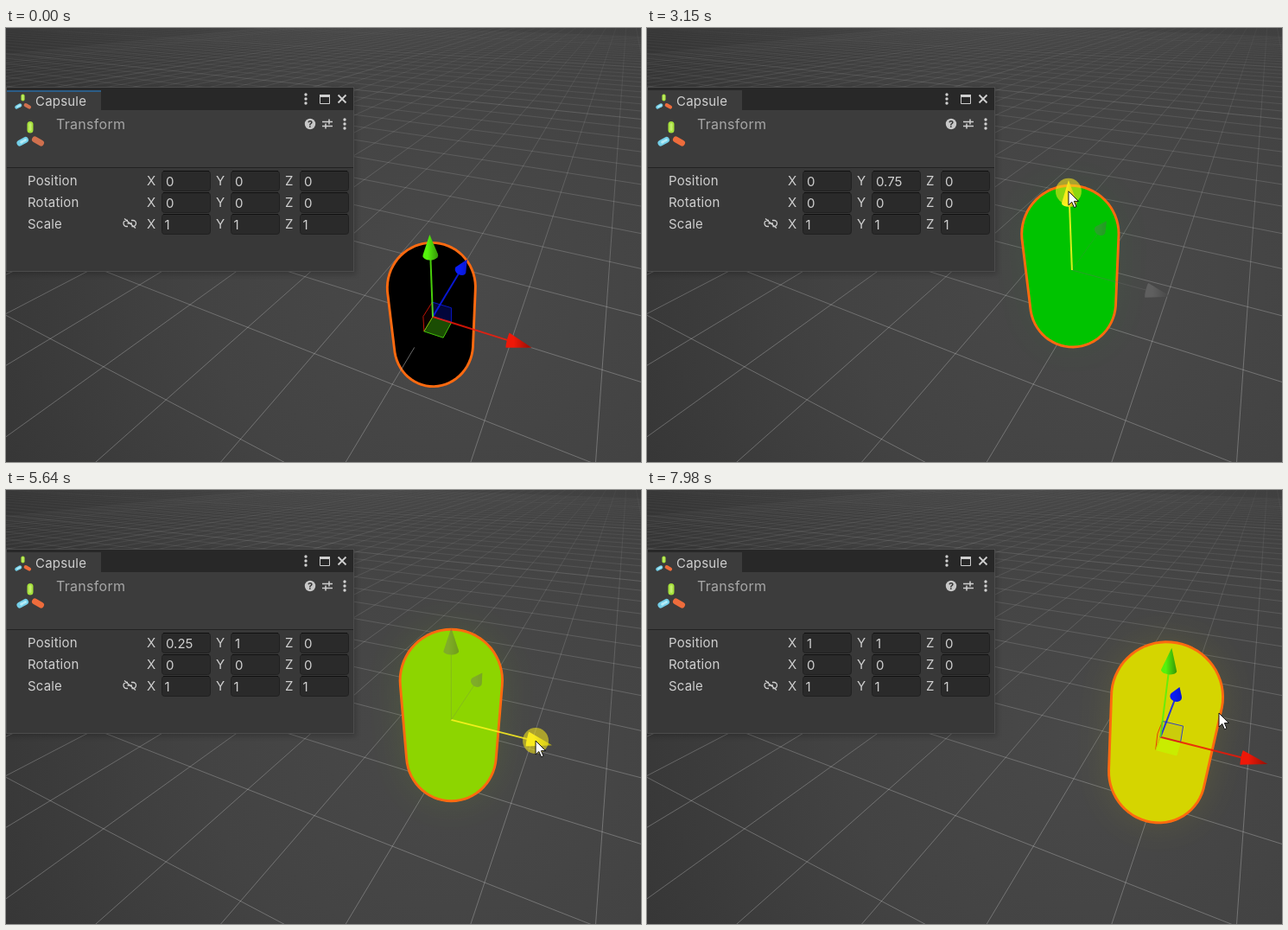
Write an HTML page that moves like this. It is 735 by 502 pixels and loops after 8 s.

```html
<!DOCTYPE html>
<html lang="en">
<head>
<meta charset="utf-8">
<title>Capsule position colour</title>
<style>
  html, body { margin: 0; width: 100%; height: 100%; overflow: hidden; background: #404040; }
  svg { display: block; width: 735px; height: 502px; }
  text { font-family: Inter, sans-serif; font-size: 15px; fill: #cfcfcf; }
  .name { letter-spacing: .15px; }
</style>
</head>
<body>
<svg id="stage" viewBox="0 0 735 502" xmlns="http://www.w3.org/2000/svg">
  <defs>
    <radialGradient id="floor" gradientUnits="userSpaceOnUse" cx="520" cy="290" r="580">
      <stop offset="0" stop-color="#494949"/>
      <stop offset=".5" stop-color="#434343"/>
      <stop offset="1" stop-color="#363636"/>
    </radialGradient>
    <linearGradient id="fade" gradientUnits="userSpaceOnUse" x1="0" y1="0" x2="0" y2="360">
      <stop offset="0" stop-color="#fff" stop-opacity=".03"/>
      <stop offset=".35" stop-color="#fff" stop-opacity=".11"/>
      <stop offset="1" stop-color="#fff" stop-opacity=".25"/>
    </linearGradient>
    <linearGradient id="shade" x1="0" y1="0" x2="1" y2="0">
      <stop offset=".3" stop-opacity="0"/>
      <stop offset="1" stop-opacity=".38"/>
    </linearGradient>
    <filter id="blur" x="-100%" y="-100%" width="300%" height="300%">
      <feGaussianBlur stdDeviation="22"/>
    </filter>
    <filter id="soft" x="-10%" y="-10%" width="120%" height="120%">
      <feGaussianBlur stdDeviation="3"/>
    </filter>
  </defs>
  <rect width="735" height="502" fill="url(#floor)"/>
  <g id="grid" stroke="url(#fade)" fill="none"></g>
  <g id="scene"></g>
  <g id="panel">
    <rect x="-4" y="69" width="409" height="216" opacity=".2" filter="url(#soft)"/>
    <rect y="68" width="403" height="214" fill="#4c4c4c"/>
    <rect x="1" y="69" width="401" height="26" fill="#282828"/>
    <path d="M1 95V72H110V95Z" fill="#3c3c3c"/>
    <rect id="focus" x="1" y="72" width="109" height="2" fill="#2c5d87"/>
    <rect x="1" y="95" width="401" height="66" fill="#3c3c3c"/>
    <rect x="1" y="161" width="401" height="1" fill="#222"/>
    <rect x="1" y="162" width="401" height="119" fill="#383838"/>
    <text x="34" y="90" style="letter-spacing:.2px">Capsule</text>
    <text x="58" y="117" style="font-size:16px;letter-spacing:.3px;fill:#a6a6a6">Transform</text>
    <g fill="none" stroke="#cfcfcf">
      <path d="M363.5 77.5H374.5V87.5H363.5Z"/>
      <path d="M363 78.5H375" stroke-width="3"/>
      <path d="M384.5 77.5L393.5 86.5M393.5 77.5L384.5 86.5" stroke-width="1.8"/>
      <path d="M366 108.5H378M366 113.5H378M374 105.5V111.5M370 110.5V116.5" stroke-width="1.5"/>
      <path d="M141 222.5H139.5A3.5 3.5 0 0 0 139.5 229.5H141M145 222.5H147A3.5 3.5 0 0 1 147 229.5H145.5M140.5 226H146M137 220.5L150 231.5" stroke-width="1.3"/>
    </g>
    <circle cx="352" cy="111" r="6.2" fill="#c8c8c8"/>
    <text x="352" y="115" text-anchor="middle" style="font-size:11px;font-weight:700;fill:#333">?</text>
  </g>
  <g id="top"></g>
</svg>
<script>
const LOOP = 8000, F = 426, CX = 516, CY = 221, DIST = 4.594;
const rad = Math.PI / 180, PITCH = 31.9 * rad, YAW = 22.2 * rad;
const sp = Math.sin(PITCH), cp = Math.cos(PITCH), sy = Math.sin(YAW), cy = Math.cos(YAW);
const byId = id => document.getElementById(id);

function el(tag, attrs, parent) {
  const e = document.createElementNS('http://www.w3.org/2000/svg', tag);
  set(e, attrs);
  parent.appendChild(e);
  return e;
}
function set(e, attrs) {
  for (const k in attrs) e.setAttribute(k, attrs[k]);
}

// World to camera space: right, down, forward
function view([x, y, z]) {
  const ahead = z * cy - x * sy;
  return [
    (494 - CX) / F * DIST + x * cy + z * sy,
    (334 - CY) / F * DIST - y * cp - ahead * sp,
    DIST + ahead * cp - y * sp
  ];
}
const flat = ([x, y, z]) => [CX + F * x / z, CY + F * y / z];
const project = p => flat(view(p));
const pathOf = pts => 'M' + pts.map(p => p[0].toFixed(2) + ' ' + p[1].toFixed(2)).join('L');
const closed = pts => pathOf(pts) + 'Z';
const add = (p, axis, n) => p.map((v, i) => v + axis[i] * n);

function hull(pts) {
  pts = pts.slice().sort((a, b) => a[0] - b[0] || a[1] - b[1]);
  const half = list => {
    const h = [];
    for (const p of list) {
      while (h.length > 1) {
        const a = h[h.length - 2], b = h[h.length - 1];
        if ((b[0] - a[0]) * (p[1] - a[1]) - (b[1] - a[1]) * (p[0] - a[0]) > 0) break;
        h.pop();
      }
      h.push(p);
    }
    return h.slice(0, -1);
  };
  return half(pts).concat(half(pts.reverse()));
}

// Silhouette of a ball as seen by the camera
function ballRim(center, r) {
  const c = view(center), d = Math.hypot(...c), n = c.map(v => v / d);
  const l = Math.hypot(n[0], n[2]), u = [-n[2] / l, 0, n[0] / l];
  const v = [n[1] * u[2], n[2] * u[0] - n[0] * u[2], -n[1] * u[0]];
  const k = 1 - r * r / d / d, rr = r * Math.sqrt(k), pts = [];
  for (let i = 0; i < 64; i++) {
    const a = i / 32 * Math.PI;
    pts.push(flat(c.map((q, j) => q * k + (u[j] * Math.cos(a) + v[j] * Math.sin(a)) * rr)));
  }
  return pts;
}

// Floor grid
function gridLine(a, b, major) {
  const d = pathOf([project(a), project(b)]);
  el('path', { d }, byId('grid'));
  if (major) el('path', { d, opacity: .6 }, byId('grid'));
}
for (let x = -34; x <= 12; x++)
  gridLine([x, 0, (.3 - DIST + x * sy * cp) / (cy * cp)], [x, 0, 60], x % 10 === 0 && x);
for (let z = -4; z <= 36; z++)
  gridLine([-70, 0, z], [(DIST + z * cy * cp - .3) / (sy * cp), 0, z], z % 10 === 0 && z);

// Panel details
const panel = byId('panel'), fields = [];
function dots(x, y) {
  for (const k of [-5, 0, 5]) el('circle', { cx: x, cy: y + k, r: 1.7, fill: '#cfcfcf' }, panel);
}
dots(347, 82);
dots(392, 111);
const label = (x, y, s) => {
  const t = el('text', { x, y }, panel);
  t.textContent = s;
  return t;
};
['Position', 'Rotation', 'Scale'].forEach((name, row) => {
  const y = 165 + row * 25, inset = row === 2 ? 2.5 : 4;
  label(25, y + 17, name).setAttribute('class', 'name');
  ['X', 'Y', 'Z'].forEach((axis, col) => {
    const x = 181 + col * 80;
    label(x - 18, y + 17, axis);
    el('rect', { x: x - .5, y: y + .5, width: 56, height: 23, rx: 3, fill: '#2a2a2a', stroke: '#202020' }, panel);
    el('path', { d: `M${x + 1} ${y + .5}h53`, stroke: '#101010' }, panel);
    fields.push(label(x + inset, y + 18, row === 2 ? '1' : '0'));
  });
});
function trio(x, y, s) {
  const arm = (d, stroke, extra) => el('path', {
    d, stroke, 'stroke-width': 7, 'stroke-linecap': 'round', fill: 'none',
    transform: `translate(${x} ${y}) scale(${s})`, ...extra
  }, panel);
  arm('M0 -11.5V-5', '#a5e03c');
  arm('M0 -11.5V-5', '#c4ee6a', { 'stroke-width': 3, 'stroke-dasharray': '2 2' });
  arm('M-5.5 6.5L-12 10', '#74cfe8');
  arm('M-5.5 6.5L-12 10', '#b4ecf8', { 'stroke-width': 3, 'stroke-dasharray': '1.5 2.5' });
  return arm('M5.5 6L12.5 10', '#d0704e');
}
const arms = [trio(28, 123, 1), trio(19.5, 85.5, .6)];

// Capsule
const scene = byId('scene');
const glow = el('path', { filter: 'url(#blur)' }, scene);
const body = el('path', {
  stroke: '#ff6a10', 'stroke-width': 5.8, 'stroke-linejoin': 'round', 'paint-order': 'stroke'
}, scene);
const seam = el('path', {
  d: pathOf([project([0, 0, -.5]), project([0, 0, -.82])]), stroke: '#b0b0b0'
}, scene);

// Move handle
const AXES = { x: [1, 0, 0], y: [0, 1, 0], z: [0, 0, 1] };
const COLORS = { x: '#ee1808', y: '#55f20c', z: '#0a1cf5' };
const planes = ['x', 'y', 'z'].map(k => ({ k, e: el('path', { stroke: COLORS[k] }, scene) }));
const handles = {};
for (const k of ['z', 'x', 'y']) {
  const g = el('g', {}, scene);
  handles[k] = {
    g, shaft: el('path', { fill: 'none' }, g),
    cone: el('path', {}, g), dark: el('path', { fill: 'url(#shade)' }, g)
  };
}

const halo = el('circle', { r: 15, fill: '#f4e61c' }, byId('top'));
const pointer = el('path', {
  d: 'M0 0V16L3.8 12.5L6.5 18.8L9 17.7L6.4 11.6H11.5Z',
  fill: '#fff', stroke: '#111'
}, byId('top'));

// time, x, y, eased
const PATH = [
  [180, 652, 490], [330, 494, 264, 1], [450, 494, 264], [760, 514, 262, 1], [1050, 495, 251, 1],
  [2210, 495, 251], [2570, 489, 219], [3000, 488, 190], [3120, 488, 190], [3690, 487, 168],
  [4240, 487, 168], [5060, 594, 287, 1], [5090, 594, 287], [5640, 613, 290], [5890, 629, 297],
  [6430, 659.5, 306.5], [6720, 671, 309], [7300, 690, 311], [7770, 690, 311], [7980, 662, 258, 1]
];
function pointerAt(t) {
  let i = 1;
  while (i < PATH.length - 1 && t > PATH[i][0]) i++;
  const a = PATH[i - 1], b = PATH[i];
  let k = clamp((t - a[0]) / (b[0] - a[0]));
  if (b[3]) k = k * k * (3 - 2 * k);
  return [a[1] + (b[1] - a[1]) * k, a[2] + (b[2] - a[2]) * k];
}
const clamp = v => Math.min(1, Math.max(0, v));
const snap = v => clamp(Math.round(v * 4) / 4);
const tone = v => Math.round(213 * Math.pow(v, .3));
const within = (t, a, b) => t >= a && t < b;
const pulse = (t, a, b) => clamp(Math.min((t - a + 20) / 70, (b - t) / 70));

function drawHandle(k, o, s, hot, drag) {
  const a = AXES[k], [b, c] = Object.keys(AXES).filter(n => n !== k).map(n => AXES[n]);
  const base = add(o, a, .96 * s), rim = [project(add(o, a, 1.24 * s))];
  for (let i = 0; i < 20; i++) {
    const q = i / 10 * Math.PI;
    rim.push(project(add(add(base, b, Math.cos(q) * .085 * s), c, Math.sin(q) * .085 * s)));
  }
  const h = handles[k], d = closed(hull(rim)), muted = drag && k !== hot;
  const color = k === hot ? '#fff420' : muted ? '#6c6c6c' : COLORS[k];
  set(h.shaft, {
    d: pathOf([project(o), project(base)]), stroke: color,
    'stroke-width': muted ? 1 : 2, opacity: muted ? .6 : .85
  });
  set(h.cone, { d, fill: color });
  set(h.dark, { d, opacity: k === 'z' ? .4 : 1 });
  h.g.setAttribute('opacity', !muted ? 1 : k === 'x' ? .65 : .38);
}

function render(t) {
  const [px, py] = pointerAt(t);
  const y = t < 2200 ? 0 : t < 4200 ? snap((251 - py) / 75) : 1;
  const x = t < 5080 ? 0 : t < 7500 ? snap((px - 594) / 100) : 1;
  const o = [x, y, 0], s = view(o)[2] / DIST;

  const fill = `rgb(${tone(x)},${tone(y)},0)`;
  const d = closed(hull(ballRim([x, y + .5, 0], .5).concat(ballRim([x, y - .5, 0], .5))));
  set(body, { d, fill });
  set(glow, { d, fill, opacity: .13 * y * y });
  seam.setAttribute('opacity', y <= .5 ? .6 : 0);

  const drag = within(t, 1300, 4270) || within(t, 5090, 7590);
  const hot = within(t, 470, 4400) ? 'y' : within(t, 4960, 7850) ? 'x' : '';
  const w = .25 * s, ex = [1, 0, 0], ey = [0, 1, 0], ez = [0, 0, -1];
  const lit = x > 0;
  for (const { k, e } of planes) {
    const [b, c] = k === 'x' ? [ey, ez] : k === 'y' ? [ex, ez] : [ex, ey];
    const p = add(o, b, w), floor = k === 'y';
    const tint = floor && lit ? '#c4f400' : COLORS[k];
    set(e, {
      d: closed([o, p, add(p, c, w), add(o, c, w)].map(project)),
      fill: tint, stroke: tint, opacity: drag ? 0 : .8,
      'fill-opacity': floor ? (lit ? .9 : .4) : k === 'x' || lit ? .06 : .3
    });
  }
  for (const k in handles) drawHandle(k, o, s, hot, drag);

  fields[0].textContent = x;
  fields[1].textContent = y;
  byId('focus').setAttribute('opacity', t < 2240 ? 1 : 0);
  for (const e of arms) e.setAttribute('stroke', t < 3150 ? '#d0704e' : '#ee6c3c');

  pointer.setAttribute('transform', `translate(${px} ${py})`);
  pointer.setAttribute('opacity', t < 180 ? 0 : 1);
  const glint = Math.max(pulse(t, 1300, 1660), pulse(t, 2240, 3690), pulse(t, 5100, 7300));
  set(halo, { cx: px, cy: py, opacity: .58 * glint });
}

const start = performance.now();
function tick() {
  render((performance.now() - start) % LOOP);
  requestAnimationFrame(tick);
}
tick();
</script>
</body>
</html>
```
